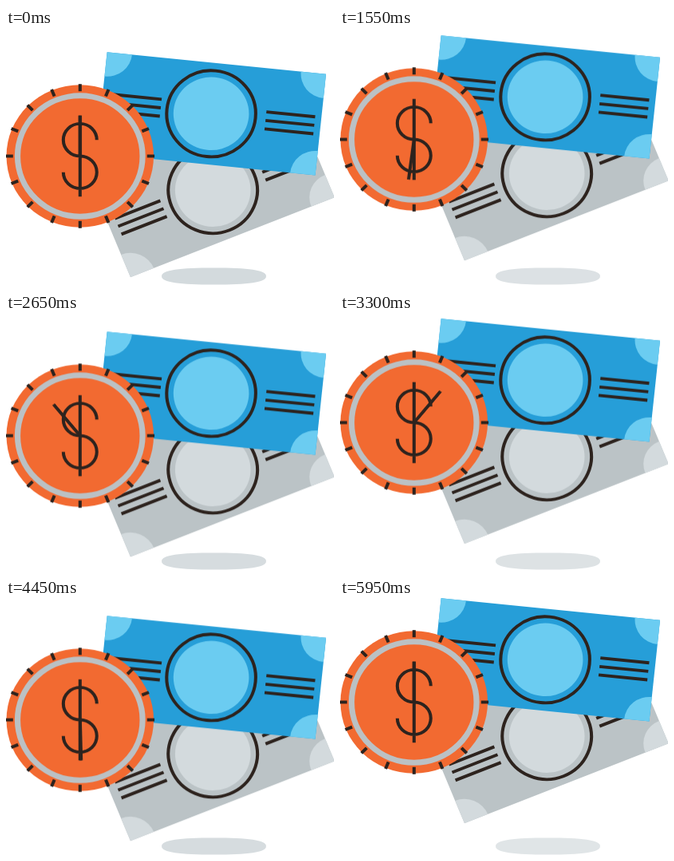
Recreate the animation shown at these times as an HTML page. Size 411 by 322 pixels, loop 6000 ms.

```html
<!DOCTYPE html>
<html lang="en">
<head>
<meta charset="utf-8">
<title>Coin clock and banknotes</title>
<style>
  html, body { margin: 0; width: 100%; height: 100%; overflow: hidden; background: #fff; }
  svg { display: block; width: 100%; height: 100%; }
  .line { fill: none; stroke: #2d231e; stroke-width: 3.9; }
  .base { fill: var(--base); }
  .light { fill: var(--light); }
  .blue { --base: #269ed8; --light: #6bccf1; --shift: 2.4px; }
  .grey { --base: #bbc3c6; --light: #d3dadd; --shift: 0px; }
  .bars { transform: translateX(var(--shift)); }
</style>
</head>
<body>
<svg viewBox="0 0 411 322">
  <defs>
    <clipPath id="edge"><rect x="-133.5" y="-63.7" width="267" height="127.4"/></clipPath>
    <g id="bill">
      <rect class="base" x="-133.5" y="-63.7" width="267" height="127.4"/>
      <g class="light" clip-path="url(#edge)">
        <circle cx="-133.5" cy="-63.7" r="30.5"/>
        <circle cx="133.5" cy="-63.7" r="30.5"/>
        <circle cx="-133.5" cy="63.7" r="30.5"/>
        <circle cx="133.5" cy="63.7" r="30.5"/>
      </g>
      <circle class="light" r="45.8"/>
      <circle class="line" r="54"/>
      <path class="line bars" d="M-123.5-11.6h59.5M-123.5-1h59.5M-123.5 9.6h59.5M64-9h59.5M64 1.7h59.5M64 12.3h59.5"/>
    </g>
  </defs>

  <path id="shadow" fill="#d3dadd" style="filter: blur(.6px)"
    d="M195 311C195 303 218 300.5 260.5 300.5S326 303 326 311S303 321.5 260.5 321.5S195 319 195 311Z"/>

  <g id="money">
    <use class="grey" href="#bill" transform="translate(259.2 203.2) scale(1.033 1) rotate(-22)"/>
    <use class="blue" href="#bill" transform="translate(257.1 107.3) scale(1.033 1) rotate(5.9)"/>
    <g transform="translate(92.8 160.5) scale(1.033 1)">
      <circle r="89.3" fill="#f26a31"/>
      <circle r="75.8" fill="none" stroke="#bbc1c4" stroke-width="7"/>
      <g id="ticks" class="line"></g>
      <path class="line" d="M20.3-20.3A20.3 20.3 0 1 0 0 0A20.3 20.3 0 1 1-20.3 20.3M0-50.7V50.7"/>
      <path id="hand" class="line" d="M0 0V-50.7"/>
    </g>
  </g>
</svg>
<script>
  const $ = id => document.getElementById(id);

  for (let i = 0; i < 16; i++) {
    const tick = document.createElementNS('http://www.w3.org/2000/svg', 'path');
    tick.setAttribute('d', 'M0-81.3V-90.3');
    tick.setAttribute('transform', `rotate(${i * 22.5})`);
    $('ticks').append(tick);
  }

  // 120 equal poses, first and last included; the loop restarts with a jump
  const timing = { duration: 6000, iterations: Infinity, easing: 'steps(120, jump-none)' };
  const play = (id, frames) => $(id).animate(frames, timing);

  // Two and a half bounces: low, high, low, high, low, high
  const bounce = (low, high) => [low, high, low, high, low, high];

  play('money', { transform: bounce('translateY(0px)', 'translateY(-30px)') });
  play('shadow', { opacity: bounce(1, 0.7) });
  play('hand', { transform: ['rotate(0deg)', 'rotate(720deg)'] });
</script>
</body>
</html>
```
